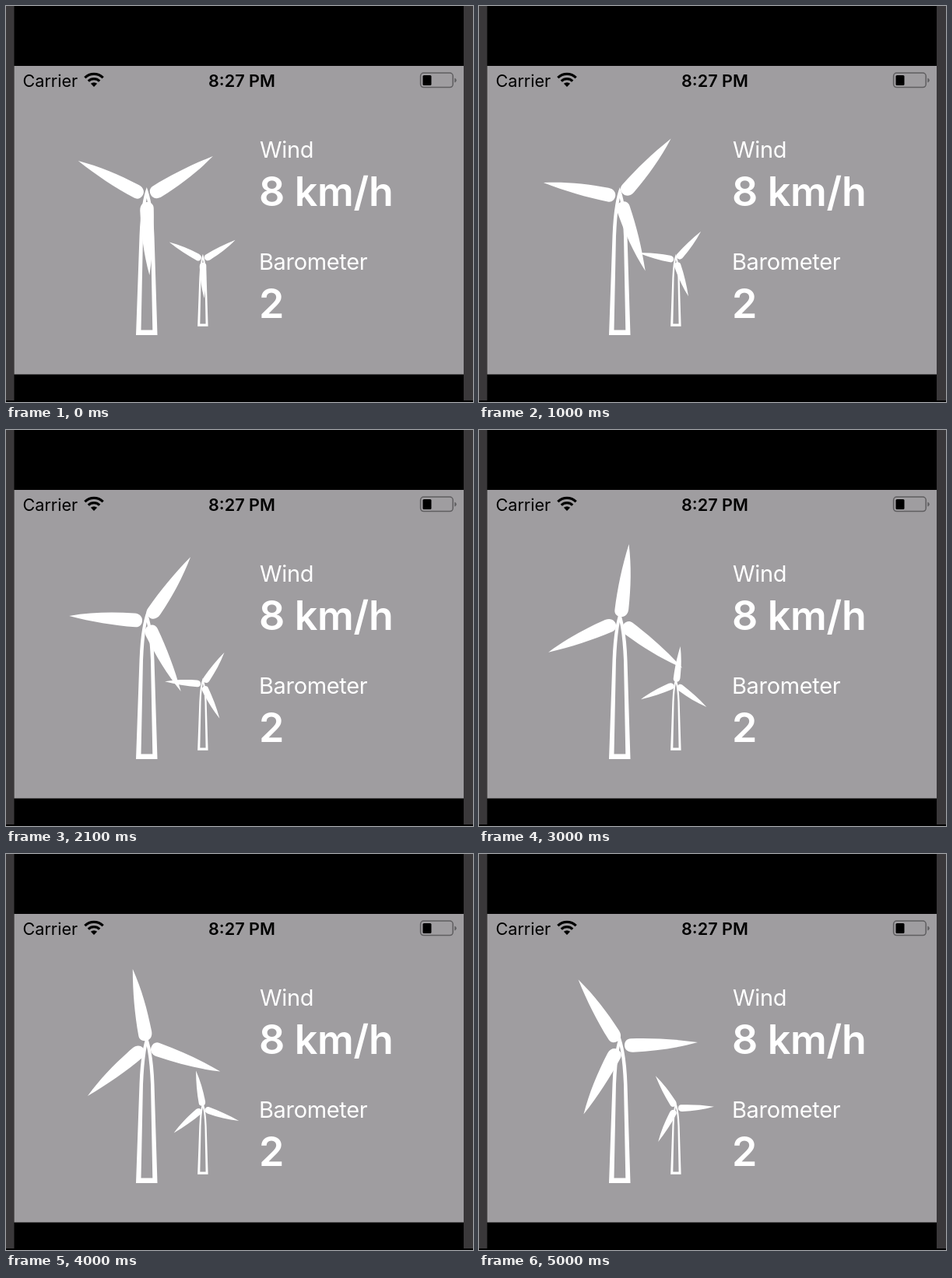
Animation, 600 px wide and 509 px high, one loop 5.1 s. Source, as an HTML page:

```html
<!DOCTYPE html>
<html lang="en">
<head>
<meta charset="utf-8">
<title>Wind</title>
<style>
  html, body { margin: 0; width: 100%; height: 100%; overflow: hidden; background: #000; }
  svg { display: block; width: 600px; height: 509px; }
  text { font-family: Inter, Roboto, sans-serif; fill: #fff; }
  .status { font-size: 21.6px; fill: #000; }
  .label { font-size: 29px; letter-spacing: -0.35px; }
  .value { font-size: 52px; font-weight: 600; letter-spacing: -0.3px; }
  .bold { font-weight: 600; text-anchor: middle; }
</style>
</head>
<body>
<svg viewBox="0 0 600 509">
  <defs>
    <path id="blade" d="M6 0C6-5 9-8.7 14-8.7C42-9.3 70-7.6 100-3C72 4.5 46 7.6 17 8.8C10 9 6 5 6 0Z"/>
    <g id="rotor">
      <use href="#blade"/>
      <use href="#blade" transform="rotate(120)"/>
      <use href="#blade" transform="rotate(240)"/>
    </g>
    <path id="tower" fill-rule="evenodd"
      d="M-14 177L-9.5 50Q-8 8-0.2-13Q8 8 9.5 50L13.5 177Z
         M-7.5 170.5L-5 50Q-3.6 18-0.2 1Q3.6 18 5 50L7.3 170.5Z"/>
  </defs>

  <path fill="#3a383a" d="M0 0H10.5V507H0ZM588 0H600V507H588Z"/>
  <rect x="10.5" y="77" width="577.5" height="396.5" fill="#9f9da0"/>

  <text class="status" x="21.5" y="104">Carrier</text>
  <g transform="translate(113 104)">
    <path d="M0 0L-4.1-4.2A5.9 5.9 0 0 1 4.1-4.2Z"/>
    <path fill="none" stroke="#000" stroke-width="3.2"
      d="M-7.2-7.4A10.3 10.3 0 0 1 7.2-7.4M-11.7-11.8A16.6 16.6 0 0 1 11.7-11.8"/>
  </g>
  <text class="status bold" x="303" y="104">8:27 PM</text>
  <rect x="532.6" y="86" width="41.6" height="18.6" rx="4" fill="none" stroke="#5f5e60" stroke-width="1.5"/>
  <rect x="535.5" y="89" width="11" height="13" rx="1.5"/>
  <path fill="#5f5e60" d="M576.3 92.5Q578.8 93.5 578.8 95.5T576.3 98.5Z"/>

  <text class="label" x="326" y="195">Wind</text>
  <text class="value" x="325" y="257">8 km/h</text>
  <text class="label" x="325" y="339">Barometer</text>
  <text class="value" x="325" y="401">2</text>

  <g fill="#fff">
    <use href="#tower" transform="translate(181 246)"/>
    <use href="#tower" transform="translate(253 325) scale(.49)"/>
    <g transform="translate(181 246)"><use class="spin" href="#rotor"/></g>
    <g transform="translate(253 326.7) scale(.49)"><use class="spin" href="#rotor"/></g>
  </g>
</svg>
<script>
  const LOOP = 5100, STEP = 100, TURN = 3500, START = -30.2;
  const END = 4955; // the last step is only about half as long
  const rotors = document.querySelectorAll('.spin');

  function draw(now) {
    const t = Math.min(Math.floor(now % LOOP / STEP) * STEP, END);
    const angle = START + 360 * t / TURN;
    rotors.forEach(r => r.setAttribute('transform', `rotate(${angle})`));
  }

  const t0 = performance.now();
  function tick() {
    draw(performance.now() - t0);
    requestAnimationFrame(tick);
  }
  tick();
</script>
</body>
</html>
```
